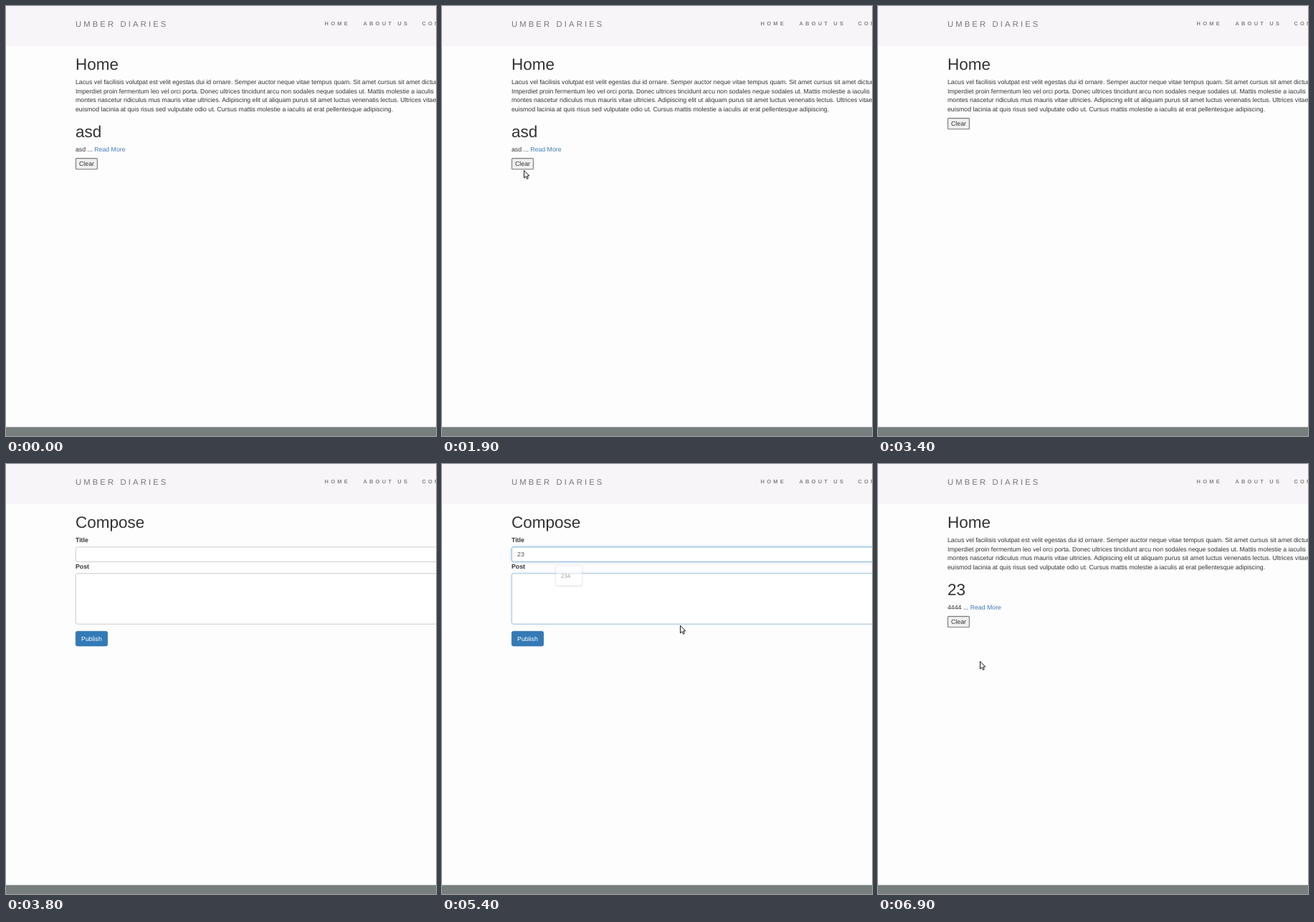
An HTML page for the animation above (7200 ms loop, 600x600 px).

```html
<!DOCTYPE html>
<html lang="en">
<head>
<meta charset="utf-8">
<title>Blog demo</title>
<style>
  html, body { margin: 0; width: 100%; height: 100%; overflow: hidden; background: #fefdfe; }
  svg { display: block; width: 600px; height: 600px; }
  text { font: 8.75px "Liberation Sans", Arial, sans-serif; fill: #333; text-rendering: geometricPrecision; white-space: pre; }
  .h1 { font-size: 22.5px; }
  .brand { font-size: 11.25px; letter-spacing: 3.125px; fill: #777; }
  .nav { font-size: 7.5px; font-weight: 700; letter-spacing: 3.2px; fill: #858585; }
  .label { font-weight: 700; }
  .link { fill: #3f7ab7; }
  .typed { fill: #555; }
  .white { fill: #fff; }
  .menu text { font: 7.75px "Open Sans", "Noto Sans", sans-serif; fill: #444; }
  .menu rect { fill: #fff; stroke: #dcdcde; stroke-width: .7; filter: drop-shadow(0 1px 1.2px rgba(0, 0, 0, .22)); }
  .field { fill: #fff; stroke: #ccc; }
  .focus { fill: #fff; stroke: #66afe9; filter: drop-shadow(0 0 2.5px rgba(102, 175, 233, .6)); }
  .caret { stroke: #444; stroke-width: .8; }
  #arrow path, #hand path { fill: #fff; stroke: #1c1c1c; stroke-linejoin: round; }
  #beam path { fill: none; stroke: #333; stroke-width: 1; }
</style>
</head>
<body>
<svg viewBox="0 0 600 600">
  <rect width="600" height="600" fill="#fefdfe"/>
  <rect width="600" height="56" fill="#f7f5f7"/>
  <rect y="587.5" width="600" height="12.5" fill="#777e7e"/>
  <text class="brand" x="97" y="29">UMBER DIARIES</text>
  <text class="nav" x="444.6" y="27.4">HOME</text>
  <text class="nav" x="498.4" y="27.4">ABOUT US</text>
  <text class="nav" x="580.4" y="27.4">CONTACT US</text>

  <g id="home">
    <text class="h1" x="97" y="89">Home</text>
    <text x="97" y="109.1">Lacus vel facilisis volutpat est velit egestas dui id ornare. Semper auctor neque vitae tempus quam. Sit amet cursus sit amet dictum sit amet.</text>
    <text x="97" y="121.6">Imperdiet proin fermentum leo vel orci porta. Donec ultrices tincidunt arcu non sodales neque sodales ut. Mattis molestie a iaculis at erat.</text>
    <text x="97" y="134.1">montes nascetur ridiculus mus mauris vitae ultricies. Adipiscing elit ut aliquam purus sit amet luctus venenatis lectus. Ultrices vitae auctor</text>
    <text x="97" y="146.6">euismod lacinia at quis risus sed vulputate odio ut. Cursus mattis molestie a iaculis at erat pellentesque adipiscing.</text>
    <g id="entry">
      <text class="h1" id="entryTitle" x="97" y="182.5"></text>
      <text x="97" y="202.6"><tspan id="entryBody"></tspan> ... <tspan class="link">Read More</tspan></text>
    </g>
    <g id="clear">
      <rect id="clearBox" x="97.5" y=".6" width="29.9" height="15.2" rx="1" stroke="#7a7a7a" stroke-width="1.1"/>
      <text x="102" y="11.2">Clear</text>
    </g>
  </g>

  <g id="compose">
    <text class="h1" x="97" y="89">Compose</text>
    <text class="label" x="97" y="109.1">Title</text>
    <text class="label" x="97" y="146">Post</text>
    <rect class="field" x="97.3" y="115.9" width="560" height="20.5" rx="2.5"/>
    <rect class="field" x="97.3" y="152.8" width="560" height="70.5" rx="2.5"/>
    <rect class="focus" id="titleFocus" x="97.3" y="115.9" width="560" height="20.5" rx="2.5"/>
    <rect class="focus" id="postFocus" x="97.3" y="152.8" width="560" height="70.5" rx="2.5"/>
    <text class="typed" id="titleText" x="105.1" y="129.1"></text>
    <text class="typed" id="postText" x="105.1" y="166"></text>
    <path class="caret" id="titleCaret" d="M.4 121v10.5"/>
    <path class="caret" id="postCaret" d="M.4 158v10.5"/>
    <rect id="publish" x="97.3" y="233.4" width="44.4" height="20.6" rx="2.5" stroke="#2e6da4" stroke-width=".7"/>
    <text class="white" x="105.1" y="246.8">Publish</text>
    <g class="menu" id="menuAll"><rect x="158.5" y="141.5" width="67.5" height="141" rx="2"/></g>
    <g class="menu" id="menuOne"><rect x="159" y="142" width="36.5" height="27.5" rx="2"/></g>
  </g>

  <g id="cursor">
    <g id="arrow"><path d="M.5.5V11L3 8.7 4.6 12.3 6.3 11.5 4.7 8H7.8Z"/></g>
    <g id="beam"><path d="M-2.5-5.5H-.6L0-5 .6-5.5H2.5M0-5V5M-2.5 5.5H-.6L0 5 .6 5.5H2.5"/></g>
    <g id="hand"><path d="M-1 1Q0-.4 1 1V5.5Q2.2 4.6 3 5.8 4.2 5 4.9 6.3 6.6 5.9 6.6 7.6V10.5L5.4 13V15H-.8V13.4L-4 9.2Q-4 7.4-2.4 8L-1 9.4Z"/></g>
  </g>
</svg>
<script>
const LOOP = 7200, STEP = 100, DIGIT = 8.75 * .556;
const $ = id => document.getElementById(id);
const show = (id, on) => { $(id).style.display = on ? '' : 'none'; };
const write = (id, text) => { if ($(id).textContent !== text) $(id).textContent = text; };
const within = (t, a, b) => t >= a && t < b;
const ramp = (t, from, span) => Math.min(1, Math.max(0, (t - from) / span));
const typed = (t, word, times) => word.slice(0, times.filter(at => t >= at).length);

function fillMenu(id, items) {
  items.forEach((item, i) => {
    const el = document.createElementNS('http://www.w3.org/2000/svg', 'text');
    el.setAttribute('x', 166);
    el.setAttribute('y', 159.3 + i * 22.5);
    el.textContent = item;
    $(id).append(el);
  });
}
fillMenu('menuAll', ['dia 1', 'dia 1', 'desse', 'asda', 'Another Post', 'desse 1']);
fillMenu('menuOne', ['234']);

// Pointer visits: each list holds [time, x, y] stops, hidden outside them.
const trips = [
  [[1300, 184, 239], [1700, 114, 229], [1900, 114, 229], [2100, 112, 217], [2400, 112, 217],
   [2600, 112, 174], [2700, 125, 168], [3200, 605, 26]],
  [[3900, 596, 74], [4300, 231, 124], [5000, 231, 124], [5300, 332, 212], [5400, 332, 225],
   [5600, 332, 225], [6100, 128, 251], [6600, 128, 251], [6900, 142, 275], [LOOP, 142, 275]]
];

function pointer(t) {
  const trip = trips.find(s => within(t, s[0][0], s[s.length - 1][0]));
  if (!trip) return null;
  const i = trip.findIndex(s => s[0] > t);
  const [t0, x0, y0] = trip[i - 1], [t1, x1, y1] = trip[i];
  const k = ramp(t, t0, t1 - t0), e = k * k * (3 - 2 * k);
  return { x: x0 + (x1 - x0) * e, y: y0 + (y1 - y0) * e };
}

function render(t) {
  const composing = within(t, 3800, 6600);
  const cleared = within(t, 2300, 3800);
  const p = pointer(t);
  const inside = (x, y, w, h) => !!p && p.x >= x && p.x <= x + w && p.y >= y && p.y <= y + h;

  show('home', !composing);
  show('entry', !cleared);
  write('entryTitle', t < 3800 ? 'asd' : '23');
  write('entryBody', t < 3800 ? 'asd' : '4444');
  const top = cleared ? 156 : 212;
  $('clear').setAttribute('transform', `translate(0 ${top})`);
  $('clearBox').setAttribute('fill', inside(97, top, 31, 16) ? '#e5e5e5' : '#efefef');

  show('compose', composing);
  const title = typed(t, '23', [4700, 4900]);
  const post = typed(t, '4444', [5600, 5800, 6000, 6300]);
  write('titleText', title);
  write('postText', post);
  $('titleFocus').style.opacity = ramp(t, 4400, 150) - ramp(t, 5350, 150);
  $('postFocus').style.opacity = ramp(t, 5350, 150);
  show('titleCaret', within(t, 4400, 5300));
  show('postCaret', t >= 5500);
  $('titleCaret').setAttribute('transform', `translate(${105.1 + title.length * DIGIT})`);
  $('postCaret').setAttribute('transform', `translate(${105.1 + post.length * DIGIT})`);
  show('menuAll', within(t, 4400, 4700));
  show('menuOne', within(t, 4700, 5500));
  $('menuOne').style.opacity = 1 - .45 * ramp(t, 5300, 100);

  const onPublish = composing && inside(97, 233, 45, 21);
  const onField = composing && (inside(97, 115, 503, 22) || inside(97, 152, 503, 71));
  $('publish').setAttribute('fill', onPublish ? '#286090' : '#337ab7');
  show('cursor', p);
  show('arrow', !onPublish && !onField);
  show('beam', onField);
  show('hand', onPublish);
  if (p) $('cursor').setAttribute('transform', `translate(${p.x} ${p.y})`);
}

function tick() {
  render(Math.floor(performance.now() % LOOP / STEP) * STEP);
  requestAnimationFrame(tick);
}
tick();
</script>
</body>
</html>
```
